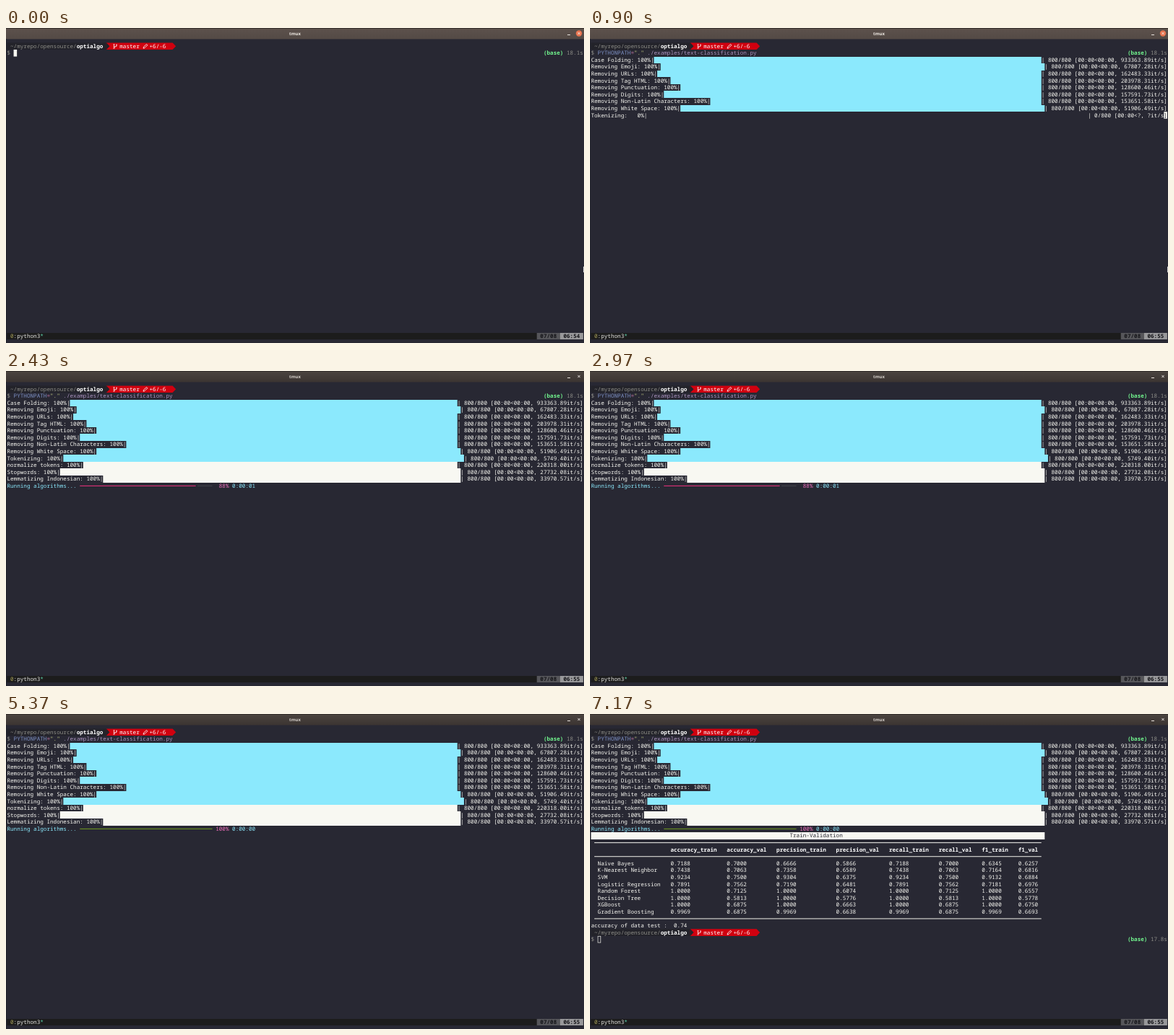
Recreate the animation shown at these times as an HTML page with a canvas. Size 800 by 437 pixels, loop 7.2 s.

```html
<!DOCTYPE html>
<html>
<head>
<meta charset="utf-8">
<title>Terminal</title>
<style>
  html, body { margin: 0; width: 100%; height: 100%; overflow: hidden; background: #282833; }
  canvas { display: block; }
</style>
</head>
<body>
<canvas id="stage" width="800" height="437"></canvas>
<script>
const ctx = document.getElementById('stage').getContext('2d');
// An 11 x 23 character cell on a 1920 px wide screen, scaled to 800
const SCALE = 800 / 1920, CW = 11 * SCALE, RH = 23 * SCALE, COLS = 174;
const LOOP = 7200;
const BG = '#282833', FG = '#f8f8f2', GREY = '#8e8e88', CYAN = '#8be9fd', WHITE = '#f8f8f2';
const MONO = '"Noto Sans Mono", "DejaVu Sans Mono", monospace';

// Moments in ms
const COMMAND = 150, ENTER = 270, MINUTE = 480, BLUR = 1200,
  RUN = 1300, TABLE = 5760, DONE = 6780;
const ALGO_DONE = [1500, 1620, 1740, 1830, 1950, 2070, 2250, 3540];

// label, rate, time shown, bar colour
const steps = [
  ['Case Folding', '933363.89', 780, CYAN],
  ['Removing Emoji', '67807.28', 792, CYAN],
  ['Removing URLs', '162483.33', 804, CYAN],
  ['Removing Tag HTML', '203978.31', 816, CYAN],
  ['Removing Punctuation', '128600.46', 828, CYAN],
  ['Removing Digits', '157591.73', 840, CYAN],
  ['Removing Non-Latin Characters', '153651.58', 852, CYAN],
  ['Removing White Space', '51906.49', 864, CYAN],
  ['Tokenizing', '5749.40', 960, CYAN],
  ['normalize tokens', '220318.00', 1000, WHITE],
  ['Stopwords', '27732.08', 1050, WHITE],
  ['Lemmatizing Indonesian', '33970.57', 1170, WHITE]
];

const heads = ['accuracy_train', 'accuracy_val', 'precision_train', 'precision_val',
  'recall_train', 'recall_val', 'f1_train', 'f1_val'];
// accuracy, precision and f1 pairs; recall equals accuracy
const scores = [
  ['Naive Bayes', '0.7188 0.7000 0.6666 0.5866 0.6345 0.6257'],
  ['K-Nearest Neighbor', '0.7438 0.7063 0.7358 0.6589 0.7164 0.6816'],
  ['SVM', '0.9234 0.7500 0.9304 0.6375 0.9132 0.6884'],
  ['Logistic Regression', '0.7891 0.7562 0.7190 0.6481 0.7181 0.6976'],
  ['Random Forest', '1.0000 0.7125 1.0000 0.6074 1.0000 0.6557'],
  ['Decision Tree', '1.0000 0.5813 1.0000 0.5776 1.0000 0.5778'],
  ['XGBoost', '1.0000 0.6875 1.0000 0.6663 1.0000 0.6750'],
  ['Gradient Boosting', '0.9969 0.6875 0.9969 0.6638 0.9969 0.6693']
];

const X = col => 1.4 + col * CW;
const Y = row => 20.4 + row * RH;

function rect(x, y, w, h, color) {
  ctx.fillStyle = color;
  ctx.fillRect(x, y, w, h);
}

function text(row, col, str, color = FG, bold = false) {
  ctx.font = `${bold ? 'bold ' : ''}7.64px ${MONO}`;
  ctx.textAlign = 'left';
  ctx.fillStyle = color;
  [...str].forEach((ch, i) => {
    if (ch !== ' ') ctx.fillText(ch, X(col + i), Y(row) + 7.3);
  });
}

// Fills whole cells, snapped to pixels so rows join cleanly
function cells(row, from, to, color) {
  const y = Math.round(Y(row));
  rect(X(from), y, (to - from) * CW, Math.round(Y(row + 1)) - y, color);
}

function rule(row, from, to, color, width = 1) {
  rect(X(from), Y(row) + 4.8 - width / 2, (to - from) * CW, width, color);
}

function shape(points, color) {
  ctx.fillStyle = color;
  ctx.beginPath();
  points.forEach(([x, y]) => ctx.lineTo(x, y));
  ctx.fill();
}

function stroke(path, color, x, y) {
  ctx.save();
  ctx.translate(x, y);
  ctx.strokeStyle = color;
  ctx.lineWidth = 0.9;
  ctx.stroke(new Path2D(path));
  ctx.restore();
}

function cursor(row, col, focused) {
  const x = X(col), y = Y(row);
  if (focused) return rect(x, y, CW, RH, '#f8f8f2');
  ctx.strokeStyle = '#d8d8d4';
  ctx.lineWidth = 0.8;
  ctx.strokeRect(x + 0.4, y + 0.4, CW - 0.8, RH - 0.8);
}

function prompt(row, seconds) {
  const top = Y(row), bottom = Y(row + 1), mid = (top + bottom) / 2;
  const red = '#d0000f', dark = '#23232a';
  rect(X(0), top, X(30) - X(0), RH, dark);
  shape([[X(30), top], [X(50), top], [X(51), mid], [X(50), bottom], [X(30), bottom]], red);
  shape([[X(30), top], [X(31), mid], [X(30), bottom]], dark);
  text(row, 1, '~/myrepo/opensource/', GREY);
  text(row, 21, 'optialgo', '#ffffff', true);
  stroke('M-1.5-2V2.5M2-1.5V0L-1.5 1.5M-2.4-2.5h1.8M1.1-2h1.8M-2.4 3h1.8', '#ffffff', 151, mid);
  text(row, 34, 'master', '#ffffff');
  stroke('M-3 3L-2.4 1 1.4-2.8 2.8-1.4-1 2.4Z', '#ffffff', 193, mid);
  text(row, 43, '+6/-6', '#ffffff');
  text(row + 1, 0, '$', GREY);
  text(row + 1, 162, '(base)', '#72f78f', true);
  text(row + 1, 169, seconds, GREY);
}

function titleBar(focused) {
  const g = ctx.createLinearGradient(0, 0, 0, 15);
  g.addColorStop(0, focused ? '#5d524d' : '#4b4440');
  g.addColorStop(1, focused ? '#544a45' : '#3c3532');
  rect(0, 0, 800, 15.4, g);
  rect(0, 0, 800, 0.8, '#2b2624');
  ctx.font = 'bold 6px "Open Sans", sans-serif';
  ctx.textAlign = 'center';
  ctx.fillStyle = focused ? '#f0ebe4' : '#d5cfc9';
  ctx.fillText('tmux', 400, 10);
  rect(777, 9, 4, 1, '#e8e2dc');
  if (focused) {
    ctx.fillStyle = '#e9744f';
    ctx.beginPath();
    ctx.arc(793, 7.5, 4.2, 0, 7);
    ctx.fill();
  }
  stroke('M-1.6-1.6L1.6 1.6M1.6-1.6L-1.6 1.6', '#f4efea', 793, 7.5);
}

function statusBar(t) {
  cells(42, 0, COLS, '#1c1c1c');
  text(42, 1, '0', '#a8a05a');
  text(42, 2, ':python3', '#e8e8e4');
  text(42, 10, '*', '#5fd7af');
  cells(42, 160, 167, '#56565a');
  cells(42, 167, COLS, '#98989a');
  text(42, 161, '07/08', '#16161a', true);
  text(42, 168, t < MINUTE ? '06:54' : '06:55', '#16161a', true);
}

function tqdm(row, [label, rate, , color], done) {
  const left = `${label}: ${done ? '100' : '  0'}%|`;
  const right = done ? `| 800/800 [00:00<00:00, ${rate}it/s]` : '| 0/800 [00:00<?, ?it/s]';
  const end = COLS - right.length;
  if (done) cells(row, left.length, end, color);
  text(row, 0, left);
  text(row, end, right);
}

function progress(row, t) {
  const n = ALGO_DONE.filter(at => t >= at).length, full = n === 8, edge = 22 + n * 5;
  const eta = n ? '0:00:0' + Math.ceil((8 - n) / 2.3) : '-:--:--';
  text(row, 0, 'Running algorithms...', CYAN);
  rule(row, 22, edge, full ? '#729c1f' : '#f0327f');
  if (!full) rule(row, edge + (n ? 0.5 : 0), 62, '#44454c');
  text(row, 63, `${Math.floor(n * 12.5 + (n % 4 === 3 ? 0.5 : 0))}%`.padStart(4), '#f070bd');
  text(row, 68, eta, CYAN);
}

function table(row) {
  cells(row, 0, 137, WHITE);
  text(row, 60, 'Train-Validation', BG);
  [1, 3, 12].forEach(r => rule(row + r, 1, 136, '#dededa', 1.1));
  let col = 24;
  heads.forEach((head, i) => {
    text(row + 2, col, head, '#ffffff', true);
    scores.forEach(([, line], r) => {
      const v = line.split(' ');
      text(row + 4 + r, col, [...v.slice(0, 4), v[0], v[1], v[4], v[5]][i]);
    });
    col += head.length + 3;
  });
  scores.forEach(([name], r) => text(row + 4 + r, 2, name));
}

function draw(t) {
  const focused = t < BLUR;
  rect(0, 0, 800, 437, BG);
  titleBar(focused);
  rect(0, 15, 1, 422, '#1f2029');
  prompt(0, '18.1s');
  statusBar(t);
  if (focused) rect(799, 331, 1, 8, '#d8d8d8');

  if (t < COMMAND) return cursor(1, 2, focused);
  text(1, 2, 'PYTHONPATH', '#7d90c4');
  text(1, 12, '=', '#c47aa8');
  text(1, 13, '"."', '#c9d084');
  text(1, 17, './examples/text-classification.py', '#ab93bf');
  if (t < ENTER) return cursor(1, 50, focused);

  const shown = steps.filter(s => t >= s[2]).length;
  for (let i = 0; i < shown; i++) tqdm(i + 2, steps[i], true);
  if (shown === 8) {
    tqdm(10, steps[8], false);
    cursor(10, COLS - 1, focused);
    text(10, COLS - 1, ']', BG);
  } else if (t < RUN) {
    cursor(shown + 2, 0, focused);
  }

  if (t >= RUN) progress(14, t);
  if (t < TABLE) return;
  table(15);
  if (t < DONE) return cursor(28, 0, focused);
  text(28, 0, 'accuracy of data test :  0.74');
  prompt(29, '17.8s');
  cursor(30, 2, focused);
}

ctx.textRendering = 'geometricPrecision';
const start = performance.now();
function tick() {
  draw((performance.now() - start) % LOOP);
  requestAnimationFrame(tick);
}
tick();
</script>
</body>
</html>
```
